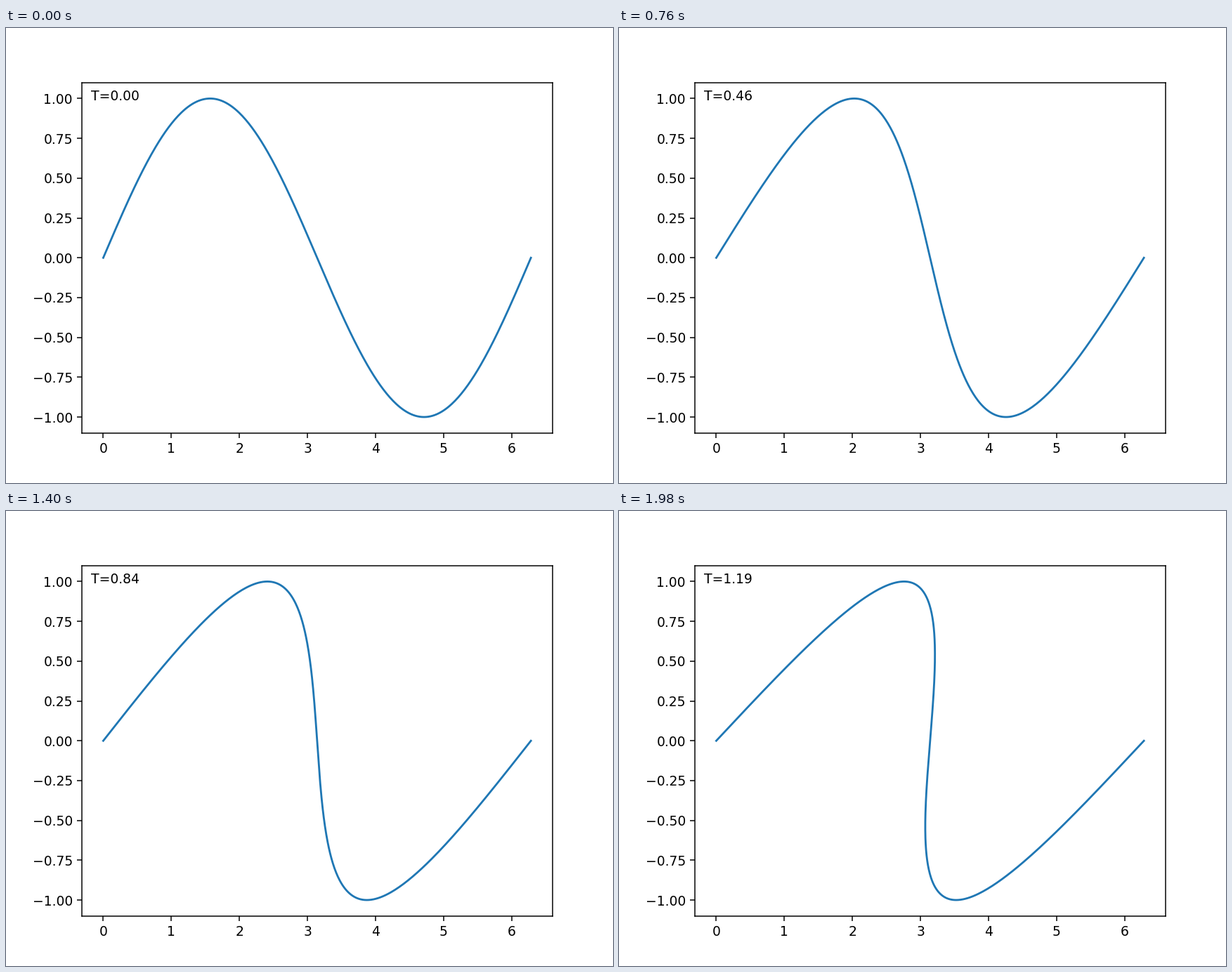
Recreate the animation shown at these times as a matplotlib script. Size 864 by 648 pixels, loop 2 s.

```python
import numpy as np
import matplotlib.pyplot as plt
from matplotlib.animation import FuncAnimation

FRAMES = 100
INTERVAL = 20
DT = 0.012

# Wave steepening along characteristics: each point moves at speed u = sin(x0)
x0 = np.linspace(0, 2 * np.pi, 401)
u = np.sin(x0)

plt.rcParams["font.family"] = "DejaVu Sans"
fig, ax = plt.subplots(figsize=(6.4, 4.8), dpi=135)
line, = ax.plot(x0, u)
label = ax.text(0.02, 0.95, "T=0.00", transform=ax.transAxes)
ax.set_xlim(ax.get_xlim())
ax.set_ylim(ax.get_ylim())


def update(frame):
    t = frame * DT
    line.set_xdata(x0 + u * t)
    label.set_text(f"T={t:.2f}")
    return line, label


anim = FuncAnimation(fig, update, frames=FRAMES, interval=INTERVAL,
                     repeat=True, repeat_delay=0)
plt.show()
```
